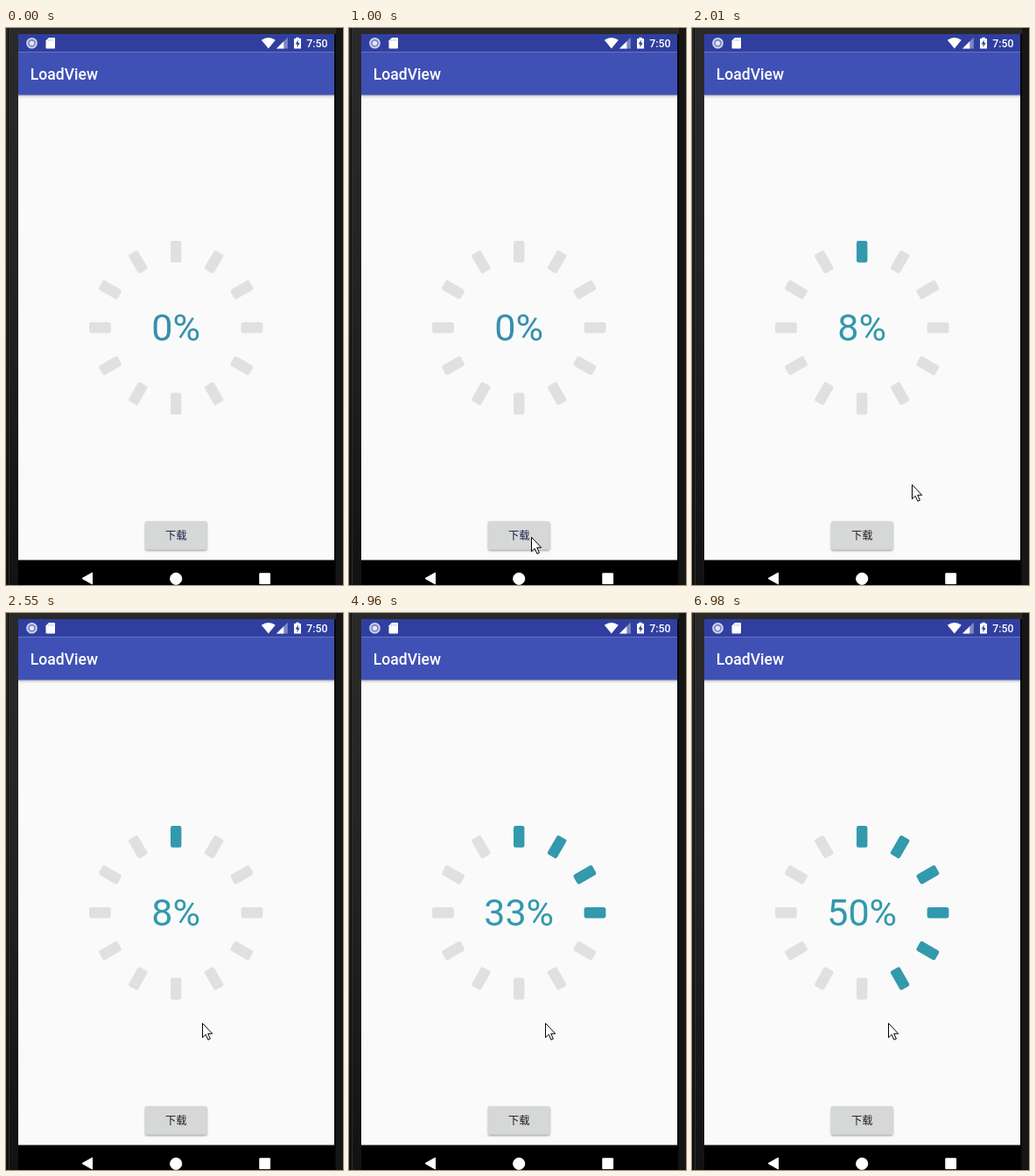
An HTML page for the animation above (7990 ms loop, 385x636 px).

```html
<!DOCTYPE html>
<html lang="zh-CN">
<head>
<meta charset="utf-8">
<title>LoadView</title>
<style>
  html, body { margin: 0; width: 100%; height: 100%; overflow: hidden; background: #161616; }
  svg { display: block; width: 100vw; height: 100vh; }
  text { font-family: Roboto, "Noto Sans CJK SC", "Noto Sans CJK", sans-serif; }
</style>
</head>
<body>
<svg viewBox="0 0 385 636" preserveAspectRatio="none">
  <defs>
    <linearGradient id="bezel" x1="0" y1="0" x2="0" y2="1">
      <stop offset="0" stop-color="#2a2a2a"/>
      <stop offset=".5" stop-color="#222"/>
      <stop offset="1" stop-color="#121212"/>
    </linearGradient>
    <linearGradient id="barShade" x1="0" y1="0" x2="0" y2="1">
      <stop offset="0" stop-color="#000" stop-opacity=".28"/>
      <stop offset=".4" stop-color="#000" stop-opacity=".09"/>
      <stop offset="1" stop-color="#000" stop-opacity="0"/>
    </linearGradient>
    <filter id="blur" x="-20%" y="-30%" width="140%" height="160%">
      <feGaussianBlur stdDeviation="1"/>
    </filter>
  </defs>

  <!-- phone body -->
  <rect width="385" height="636" fill="url(#bezel)"/>
  <rect x="2" width="1" height="636" fill="#0a0a0a"/>
  <rect x="3" width="1" height="636" fill="#303030"/>
  <rect x="375" y="7" width="2" height="629" fill="#070707"/>
  <rect x="377" width="8" height="636" fill="#161616"/>

  <!-- screen -->
  <rect x="14" y="7" width="361" height="629" fill="#fafafa"/>
  <rect x="14" y="7" width="361" height="20.5" fill="#303f9f"/>
  <rect x="14" y="27.5" width="361" height="49" fill="#3f51b5"/>
  <rect x="14" y="76.5" width="361" height="4.5" fill="url(#barShade)"/>
  <text x="27.8" y="59.3" font-size="17.56" font-weight="500" fill="#fff">LoadView</text>

  <!-- status icons -->
  <circle cx="29.5" cy="17.3" r="5.4" fill="#7f89c6" stroke="#d3d7ee" stroke-width="1.8"/>
  <circle cx="29.5" cy="17.3" r="2.6" fill="#e3e6f5"/>
  <path d="M49 11h6q1 0 1 1v10.500q0 1-1 1h-8.500q-1 0-1-1v-8z" fill="#fff"/>
  <path d="M48.700 13v2M51 13v2M53.300 13v2" stroke="#aab1dc" stroke-width=".8"/>
  <path d="M291.800 13.700q8-5.600 16 0l-8 9.800z" fill="#fff"/>
  <path d="M309 23.500h12.800v-12.800z" fill="#7d87c3"/>
  <path d="M309 23.500h8.300v-8.300z" fill="#fff"/>
  <path d="M331.300 10.700h3.400v1.300h2.300v11.500h-8v-11.500h2.300z" fill="#fff"/>
  <path d="M333.700 13.500l-3 5h1.900v3.500l3-5h-1.900z" fill="#303f9f"/>
  <text x="343.3" y="21.800" font-size="12.3" font-weight="500" fill="#fff">7:50</text>

  <!-- progress ring -->
  <g id="ring"></g>
  <text id="label" x="194.2" y="356.600" font-size="43" text-anchor="middle"></text>

  <!-- button -->
  <rect id="shade" x="159" y="564.5" width="70.500" height="32.500" rx="2" filter="url(#blur)"/>
  <rect id="button" x="158.800" y="563.200" width="70.700" height="32.600" rx="1.8"/>
  <text id="caption" x="194.2" y="584" font-size="12.3" text-anchor="middle">下载</text>

  <!-- navigation bar -->
  <rect x="14" y="607.500" width="361" height="28.500" fill="#000"/>
  <g fill="#fff" stroke="#fff" stroke-linejoin="round">
    <path d="M87 628.500l11.500-6.500v13z"/>
    <circle cx="194.200" cy="628.800" r="6.600"/>
    <rect x="289.800" y="622.800" width="11.800" height="11.800"/>
  </g>

  <path id="cursor" d="M.5.5v16.300l3.700-3.500 2.700 6 2.500-1.100-2.700-5.900h5z"
        fill="#fff" stroke="#000" stroke-linejoin="round"/>
</svg>
<script>
const LOOP = 7990;
const TEAL = '#3399ad';
const $ = id => document.getElementById(id);

// Moments at which one more bar is filled
const ticks = [2010, 3020, 3950, 4960, 5970, 6980];

// Pointer moves; "rest" moves leave from a standing position
const moves = [
  { from: 70, to: 450, steps: 6, path: [[242, 613], [202, 585]] },
  { from: 850, to: 1230, steps: 6, rest: true, path: [[202, 585], [221, 572]] },
  { from: 1390, to: 1560, steps: 3, rest: true, path: [[221, 572], [250, 516]] },
  { from: 2010, to: 2550, steps: 8, rest: true,
    path: [[250, 516], [252, 529], [240, 505], [224, 468]] }
];

const bars = Array.from({ length: 12 }, (_, i) => {
  const bar = document.createElementNS('http://www.w3.org/2000/svg', 'rect');
  const attrs = { x: 188, y: 243, width: 12.4, height: 24.8, rx: 2.4,
                  transform: `rotate(${i * 30} 194.2 342.2)` };
  for (const key in attrs) bar.setAttribute(key, attrs[key]);
  $('ring').append(bar);
  return bar;
});

function stepped(t, { from, to, steps, rest }) {
  if (t < from) return 0;
  const k = Math.min(steps - 1, Math.floor((t - from) / (to - from) * (steps - 1) + 1e-6));
  return rest ? (k + 1) / steps : k / (steps - 1);
}

function along(path, u) {
  const s = u * (path.length - 1);
  const i = Math.min(path.length - 2, Math.floor(s));
  return path[i].map((v, axis) => Math.round(v + (path[i + 1][axis] - v) * (s - i)));
}

function pressure(t) {
  const down = Math.max(0, stepped(t, moves[1]) * 3 - 2);
  return down * (1 - stepped(t, moves[2]));
}

function draw(t) {
  const filled = ticks.filter(tick => t >= tick).length;
  bars.forEach((bar, i) => bar.setAttribute('fill', i < filled ? TEAL : '#dfe1e1'));
  $('label').textContent = Math.round(filled / 12 * 100) + '%';
  $('label').setAttribute('fill', filled ? TEAL : '#388fad');

  const press = pressure(t);
  const grey = Math.round(214 - 13 * press);
  $('button').setAttribute('fill', `rgb(${grey},${grey + 1},${grey + 1})`);
  $('shade').setAttribute('fill-opacity', 0.36 + 0.08 * press);
  $('caption').setAttribute('fill', t < 1154 ? '#201d48' : '#202020');

  const move = moves.filter(m => t >= m.from).pop();
  $('cursor').setAttribute('visibility', move ? 'visible' : 'hidden');
  if (move) {
    $('cursor').setAttribute('transform', `translate(${along(move.path, stepped(t, move))})`);
  }
}

let start;
function frame(now) {
  start ??= now;
  draw((now - start) % LOOP);
  requestAnimationFrame(frame);
}
draw(0);
requestAnimationFrame(frame);
</script>
</body>
</html>
```
